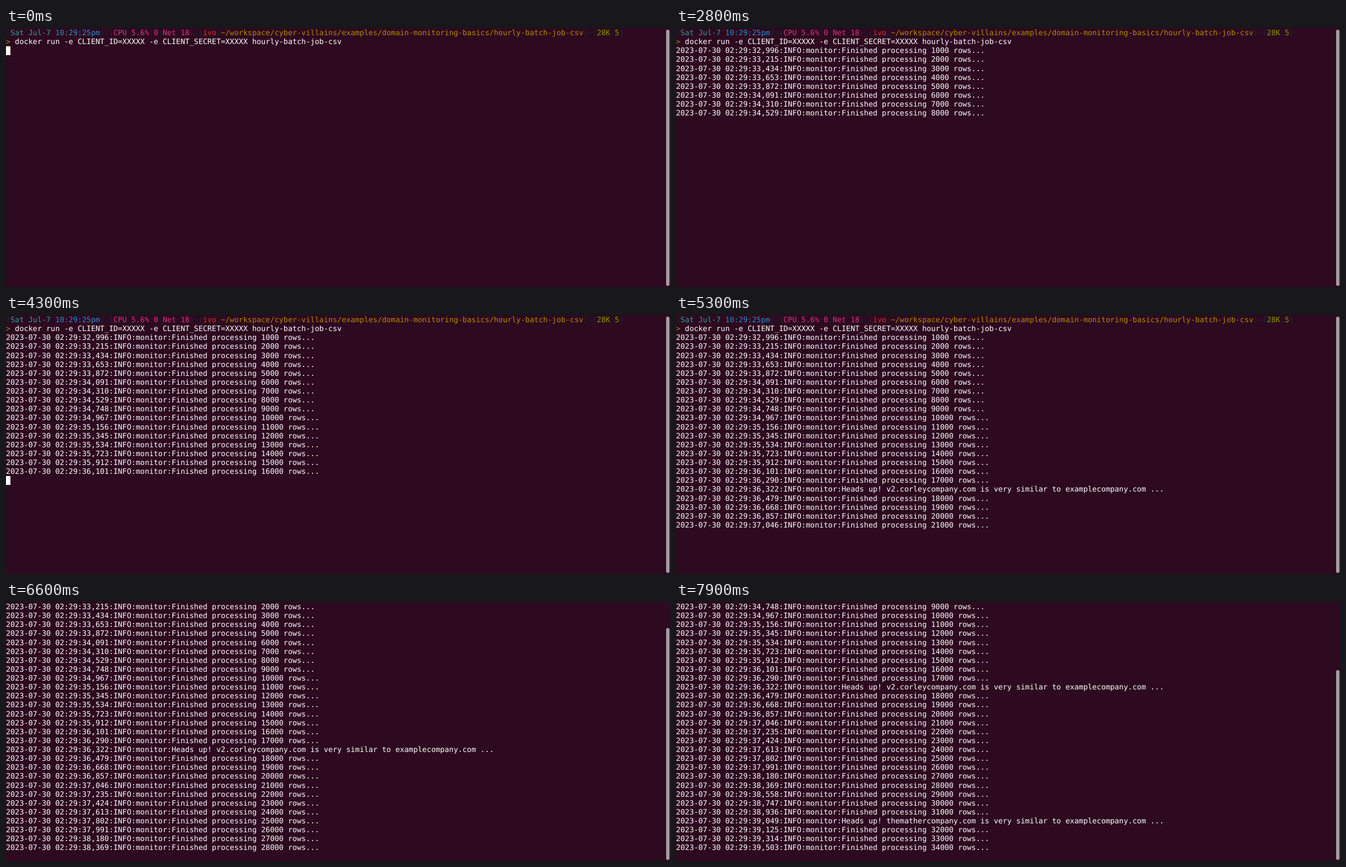
Animation, 1196 px wide and 468 px high, one loop 8000 ms. Source, as an HTML page:

```html
<!DOCTYPE html>
<html lang="en">
<head>
<meta charset="utf-8">
<title>Terminal</title>
<style>
  html, body { margin: 0; width: 100%; height: 100%; overflow: hidden; background: #2d0a1f; }
  #term {
    position: absolute; left: 0; top: 2.1px; margin: 0; color: #fff;
    font: 13.4px/16.12px "DejaVu Sans Mono", monospace;
    text-rendering: geometricPrecision; font-variant-ligatures: none;
  }
  #cursor { position: absolute; left: 0; width: 8px; height: 16px; background: #fff; }
  #bar { position: absolute; left: 1188.5px; width: 6px; bottom: 2px; border-radius: 3px; background: #a69ba2; }
  .k { color: #073642; } .c { color: #2aa198; } .b { color: #268bd2; } .m { color: #d33682; }
  .r { color: #dc322f; } .y { color: #b58900; } .g { color: #859900; }
</style>
</head>
<body>
<pre id="term"></pre>
<div id="cursor"></div>
<div id="bar"></div>
<script>
const LOOP = 8000, FRAME = 100;          // the screen refreshes ten times a second
const ROW = 16.12, ROWS = 29, TOP = 0.9; // terminal grid
const LOG_START = 31824;                 // log clock (ms in the minute) when the loop begins
const BLINK = { period: 1202, on: 690, hidden: 585 };
const [term, cursor, bar] = ["term", "cursor", "bar"].map(id => document.getElementById(id));

const paint = parts => parts.map(([cls, text]) => `<span class="${cls}">${text}</span>`).join("");
const prompt = paint([
  ["k", "("], ["c", "Sat Jul-7 "], ["b", "10:29:25pm"], ["k", ")-("],
  ["m", "CPU 5.6%"], ["k", ":"], ["m", "0"], ["k", ":"], ["m", "Net 18"], ["k", ")-("],
  ["r", "ivo"], ["k", ":"],
  ["y", "~/workspace/cyber-villains/examples/domain-monitoring-basics/hourly-batch-job-csv"],
  ["k", ")-("], ["g", "28K"], ["k", ":"], ["g", "5"], ["k", ")"]
]);
const command = paint([["g", "&gt;"]]) +
  " docker run -e CLIENT_ID=XXXXX -e CLIENT_SECRET=XXXXX hourly-batch-job-csv";

const entry = (ms, text) => ({ ms, text });
const alert = (ms, host) => entry(ms, `Heads up! ${host} is very similar to examplecompany.com ...`);

// Batches take 189 ms each; the first ten are a little slower
const batches = Array.from({ length: 34 }, (_, i) =>
  entry(32996 + 189 * i + 30 * Math.min(i, 9), `Finished processing ${i + 1}000 rows...`));
const log = [
  ...batches,
  alert(36322, "v2.corleycompany.com"),
  alert(39049, "themathercompany.com")
].sort((a, b) => a.ms - b.ms);

const format = ({ ms, text }) =>
  `2023-07-30 02:29:${(ms / 1000).toFixed(3).replace(".", ",")}:INFO:monitor:${text}`;
const lines = [prompt, command, ...log.map(format)];

let last = -1;

function draw(t) {
  const total = 2 + log.filter(e => e.ms - LOG_START <= t).length;
  const scroll = Math.max(0, total + 1 - ROWS);
  if (total !== last) {
    term.innerHTML = lines.slice(scroll, total).join("\n");
    bar.style.top = 3 + 468 * scroll / (ROWS + scroll) + "px";
    cursor.style.top = Math.round((total - scroll) * ROW + TOP) + "px";
    last = total;
  }
  const phase = (t - BLINK.on + BLINK.period) % BLINK.period;
  cursor.style.visibility = phase >= BLINK.period - BLINK.hidden ? "hidden" : "visible";
}

const start = performance.now();
function tick() {
  const t = (performance.now() - start) % LOOP;
  draw(Math.floor(t / FRAME) * FRAME);
  requestAnimationFrame(tick);
}
draw(0);
requestAnimationFrame(tick);
</script>
</body>
</html>
```
